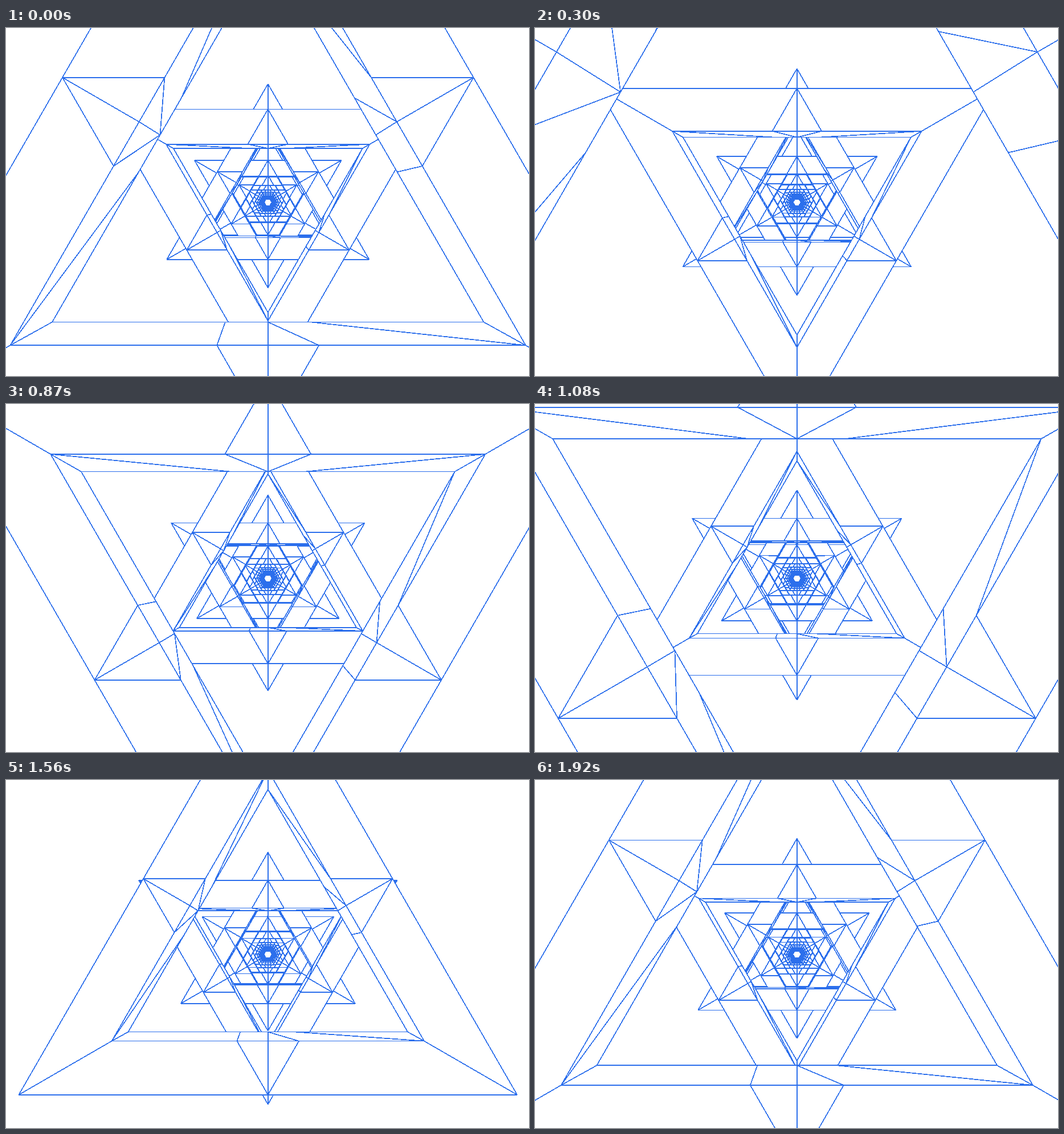
These frames come from a looping animation (918x610 px, 1.95 s). An HTML page:

```html
<!DOCTYPE html>
<html lang="en">
<head>
<meta charset="utf-8">
<title>Triangle tunnel</title>
<style>
html, body { margin: 0; width: 100%; height: 100%; overflow: hidden; background: #fff; }
svg { display: block; shape-rendering: crispEdges; }
path { fill: none; stroke: #2c6fec; stroke-width: 1.7; stroke-linejoin: bevel; }
path.solid { fill: #fff; fill-rule: evenodd; stroke: none; }
</style>
</head>
<body>
<svg id="stage" width="918" height="610" viewBox="0 0 918 610"></svg>
<script>
const CX = 459.8, CY = 305.8;
const FOCAL = 295.4;      // half width of the hole at distance 1
const OUTER = 1.595;      // frame size relative to its hole
const DEPTH = 0.127;      // thickness of a frame
const NOTCH = 0.198;      // half width of the mark on each side
const START = 0.653, COUNT = 30;
const STEP = 30, STEPS = 65, STEPS_PER_FRAME = 33;

// Each wall: normal angle, then lines from front edge to back edge,
// given as positions along the side (-1 to 1).
const WALLS = [
  [210, [[-NOTCH, 0], [NOTCH, 0], [-1, -NOTCH], [1, NOTCH]]],
  [90, [[NOTCH, NOTCH], [-NOTCH, 0], [-1, -NOTCH]]],
  [330, [[-NOTCH, -1], [0, -NOTCH], [NOTCH, NOTCH]]]
];

const stage = document.getElementById('stage');
const addPath = name => {
  const path = document.createElementNS('http://www.w3.org/2000/svg', 'path');
  path.setAttribute('class', name);
  return stage.appendChild(path);
};
// Farthest frame first, so that nearer ones cover it
const frames = Array.from({ length: COUNT }, (_, i) => ({
  k: COUNT - 1 - i, solid: addPath('solid'), lines: addPath('lines')
}));

function outline(k, z) {
  const turn = k % 2 ? 60 : 0;
  const shift = k % 2 ? 0.0063 : -0.0238;

  const place = (deg, size, along, depth) => {
    const a = (deg + turn) * Math.PI / 180;
    const r = size / Math.sqrt(3), scale = FOCAL / (z + depth);
    const x = CX + scale * (r * Math.cos(a) - along * Math.sin(a));
    const y = CY + scale * (r * Math.sin(a) + along * Math.cos(a) + shift);
    return x.toFixed(2) + ' ' + y.toFixed(2);
  };
  const line = (p, q) => `M${p}L${q}`;
  const triangle = (size, depth) =>
    'M' + WALLS.map(([deg]) => place(deg, size, size, depth)).join('L') + 'Z';

  const solid = triangle(OUTER, 0) + triangle(1, DEPTH);
  let lines = solid + triangle(1, 0);
  for (const [deg, links] of WALLS) {
    const front = s => place(deg, 1, s, 0);
    const back = s => place(deg, 1, s, DEPTH);
    const tip = place(deg, OUTER, 0, 0);
    lines += line(place(deg, OUTER, OUTER, 0), front(1)) + line(front(1), back(1));
    for (const s of [-NOTCH, 0, NOTCH]) lines += line(tip, front(s));
    for (const [s, e] of [[0, 0], ...links]) lines += line(front(s), back(e));
  }
  return { solid, lines };
}

function draw(now) {
  const step = Math.floor(now / STEP) % STEPS;
  for (const { k, solid, lines } of frames) {
    const z = START + k - step / STEPS_PER_FRAME;
    const shape = z > 0.06 ? outline(k, z) : { solid: '', lines: '' };
    solid.setAttribute('d', shape.solid);
    lines.setAttribute('d', shape.lines);
  }
}

const begin = performance.now();
function tick() {
  draw(performance.now() - begin);
  requestAnimationFrame(tick);
}
tick();
</script>
</body>
</html>
```
